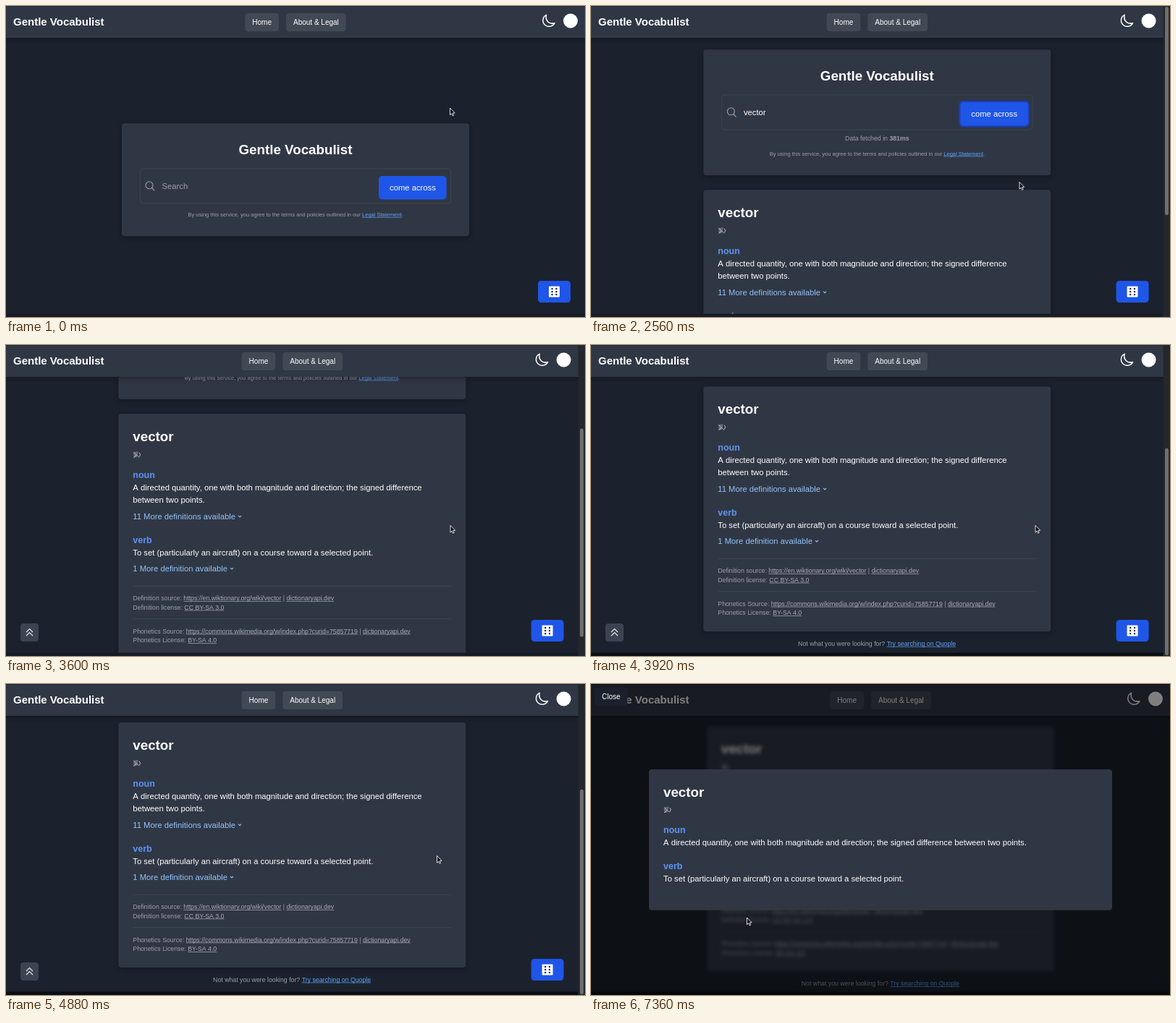
An HTML page with a canvas that plays this animation: 800x430 px, repeating every 7400 ms.

```html
<!DOCTYPE html>
<html lang="en">
<head>
<meta charset="utf-8">
<title>Gentle Vocabulist</title>
<style>
html, body { margin: 0; width: 100%; height: 100%; overflow: hidden; background: #1b222d; }
canvas { display: block; width: 800px; height: 430px; }
</style>
</head>
<body>
<canvas id="stage" width="800" height="430"></canvas>
<script>
const W = 800, H = 430, LOOP = 7400;
const NAME = 'Gentle Vocabulist', ENGINE = 'Quople';
const FONT = '"Liberation Sans", Arial, Helvetica, sans-serif';
const C = {
  bg: '#1b222d', card: '#303744', nav: '#414955', line: '#424956', white: '#ffffff',
  gray: '#99a0ab', blue: '#1f56e8', hover: '#1641d4', ring: '#1a3fbd',
  part: '#5c95f6', more: '#92c3fb', link: '#5fa2f7'
};
// moments of the story, in ms
const T = { dice: 720, word: 880, search: 1760, result: 2320, scroll: 3100, end: 4100, modal: 4900 };

const stage = document.getElementById('stage').getContext('2d');
const layer = document.createElement('canvas');
layer.width = W;
layer.height = H;
const layerCtx = layer.getContext('2d');
let g = stage;

const clamp = v => Math.max(0, Math.min(1, v));
const span = (t, a, b) => clamp((t - a) / (b - a));
const ease = p => p * p * (3 - 2 * p);

function box(x, y, w, h, r, fill) {
  g.beginPath();
  g.roundRect(x, y, w, h, r);
  g.fillStyle = fill;
  g.fill();
}

function shadowBox(x, y, w, h, r, fill) {
  g.save();
  g.shadowColor = 'rgba(0,0,0,.3)';
  g.shadowBlur = 7;
  g.shadowOffsetY = 2;
  box(x, y, w, h, r, fill);
  g.restore();
}

function stroke(points, color, width) {
  g.beginPath();
  points.forEach(([x, y], i) => i ? g.lineTo(x, y) : g.moveTo(x, y));
  g.strokeStyle = color;
  g.lineWidth = width;
  g.stroke();
}

function text(s, x, y, size, color = C.white, bold = false) {
  g.font = (bold ? 'bold ' : '') + size + 'px ' + FONT;
  g.fillStyle = color;
  g.fillText(s, x, y);
  return g.measureText(s).width;
}

function centered(s, x, y, size, color, bold) {
  g.textAlign = 'center';
  text(s, x, y, size, color, bold);
  g.textAlign = 'left';
}

// mixed line: "_" marks an underlined run, "*" a bold one
function runs(x, y, size, color, parts, linkColor = color) {
  for (const part of parts) {
    const under = part[0] === '_', bold = part[0] === '*';
    const tint = under ? linkColor : color;
    const w = text(under || bold ? part.slice(1) : part, x, y, size, tint, bold);
    if (under) {
      g.fillStyle = tint;
      g.fillRect(x, y + 1, w, 0.7);
    }
    x += w;
  }
}

function speaker(x, y) {
  g.save();
  g.translate(x, y);
  g.beginPath();
  g.moveTo(-5, -3);
  g.lineTo(-2, -4);
  g.lineTo(2, -4.5);
  g.lineTo(0, 3.5);
  g.lineTo(-4, 4);
  g.closePath();
  g.fillStyle = '#636973';
  g.fill();
  stroke([[-4.5, -3.5], [2.5, 3]], '#b4b9c0', 1);
  stroke([[-4.5, 4], [-0.5, 0.5]], '#c6cad0', 1);
  g.beginPath();
  g.arc(1, 0, 3.6, -0.9, 1.1);
  g.stroke();
  g.restore();
}

function searchCard(s) {
  const top = s.cardTop, btn = top + 72.7;
  shadowBox(160, top, 480, s.cardH, 4, C.card);
  centered(NAME, 400, top + 42.7, 18.75, C.white, true);
  g.beginPath();
  g.roundRect(185.4, top + 62.7, 429.2, 48, 4);
  g.strokeStyle = C.line;
  g.lineWidth = 0.8;
  g.stroke();
  g.beginPath();
  g.arc(198, top + 85.5, 5, 0, 7);
  g.strokeStyle = C.gray;
  g.lineWidth = 1.1;
  g.stroke();
  stroke([[201.7, top + 89.2], [205.2, top + 93]], C.gray, 1.2);
  text(s.word || 'Search', 215.6, top + 90.6, 11.25, s.word ? C.white : C.gray);
  if (s.searchFocus) box(513, btn - 2, 97.6, 36.4, 6, C.ring);
  box(515, btn, 93.6, 32.4, 4.5, s.searchHover ? C.hover : C.blue);
  text('come across', 530, top + 92.6, 11.25);
  if (s.done) runs(355.8, top + 125.6, 8.75, C.gray, ['Data fetched in ', '*381ms']);
  runs(251.5, top + s.cardH - 27.4, 7.5, C.gray,
    ['By using this service, you agree to the terms and policies outlined in our ', '_Legal Statement', '.'], C.link);
}

function more(s, y) {
  const w = text(s, 180, y, 11.25, C.more), x = 180 + w + 6;
  stroke([[x - 2, y - 5], [x, y - 3], [x + 2, y - 5]], C.more, 1.1);
}

function resultCard(y) {
  shadowBox(160, y, 480, 338.7, 4, C.card);
  text('vector', 180, y + 37.6, 18.75, C.white, true);
  speaker(185.5, y + 56.3);
  text('noun', 180, y + 88.2, 12.5, C.part, true);
  text('A directed quantity, one with both magnitude and direction; the signed difference', 180, y + 105.4, 11.25);
  text('between two points.', 180, y + 122.9, 11.25);
  more('11 More definitions available', y + 145.4);
  text('verb', 180, y + 178.2, 12.5, C.part, true);
  text('To set (particularly an aircraft) on a course toward a selected point.', 180, y + 195.4, 11.25);
  more('1 More definition available', y + 217.7);
  g.fillStyle = C.line;
  g.fillRect(180, y + 237.6, 440, 0.8);
  g.fillRect(180, y + 283, 440, 0.8);
  const small = (dy, parts) => runs(180, y + dy, 8.75, C.gray, parts, '#a5acb6');
  small(257.7, ['Definition source: ', '_https://en.wiktionary.org/wiki/vector', ' | ', '_dictionaryapi.dev']);
  small(270.2, ['Definition license: ', '_CC BY-SA 3.0']);
  small(303.2, ['Phonetics Source: ', '_https://commons.wikimedia.org/w/index.php?curid=75857719', ' | ', '_dictionaryapi.dev']);
  small(315.7, ['Phonetics License: ', '_BY-SA 4.0']);
}

function header(dx) {
  g.save();
  g.shadowColor = 'rgba(0,0,0,.35)';
  g.shadowBlur = 8;
  g.shadowOffsetY = 2;
  g.fillStyle = C.card;
  g.fillRect(-20, 0, W + 40, 44);
  g.restore();
  g.fillStyle = '#222933';
  g.fillRect(0, 0, W, 1);
  text(NAME, 10, 27.4, 15, C.white, true);
  g.save();
  g.translate(dx, 0);
  box(330.3, 10, 46.7, 25, 4, C.nav);
  text('Home', 340.3, 26, 10);
  box(387, 10, 82.7, 25, 4, C.nav);
  text('About & Legal', 397, 26, 10);
  g.restore();
  g.save();
  g.translate(dx * 2, 0);
  g.beginPath();
  g.moveTo(746.6, 12.4);
  g.bezierCurveTo(744.5, 20, 750.5, 25.8, 758, 23.6);
  g.bezierCurveTo(755.6, 28.6, 749, 29.8, 744.8, 26.2);
  g.bezierCurveTo(740, 21.6, 741.4, 15, 746.6, 12.4);
  g.closePath();
  g.strokeStyle = C.white;
  g.lineWidth = 1.5;
  g.lineJoin = 'round';
  g.stroke();
  g.beginPath();
  g.arc(780, 20.5, 10, 0, 7);
  g.fillStyle = C.white;
  g.fill();
  g.restore();
}

function diceButton(dx, focus, hover) {
  const x = 735 + dx * 2;
  if (focus) box(x - 2, 378, 49, 34, 6, C.ring);
  box(x, 380, 45, 30, 4.5, hover ? C.hover : C.blue);
  box(x + 15, 387.5, 15, 15, 1, C.white);
  for (let i = 0; i < 6; i++) {
    g.beginPath();
    g.arc(x + 19.6 + (i % 2) * 5.8, 391 + (i >> 1) * 4, 1.2, 0, 7);
    g.fillStyle = '#1a2340';
    g.fill();
  }
}

function upButton(alpha) {
  g.save();
  g.globalAlpha = alpha;
  box(20, 385, 25, 25, 4, '#3d4451');
  for (const y of [397, 402]) stroke([[28, y], [32.5, y - 4.5], [37, y]], '#eceef0', 1.1);
  g.restore();
}

function scrollbar(scroll) {
  g.fillStyle = '#24272b';
  g.fillRect(790.6, 0, 9.4, H);
  const top = 1 + scroll * 0.72;
  box(793, top, 5, Math.min(288, 429 - top), 2.5, '#6c6e70');
}

function modal() {
  box(80, 118, 640, 194.7, 4, C.card);
  text('vector', 100, 155.6, 18.75, C.white, true);
  speaker(105.5, 174);
  text('noun', 100, 206.2, 12.5, C.part, true);
  text('A directed quantity, one with both magnitude and direction; the signed difference between two points.', 100, 223, 11.25);
  text('verb', 100, 256.2, 12.5, C.part, true);
  text('To set (particularly an aircraft) on a course toward a selected point.', 100, 273, 11.25);
  box(5, 5, 45.5, 25, 4, '#1a212c');
  text('Close', 15, 21.3, 10);
}

// time, x, y of the pointer tip
const PATH = [
  [0, 613.5, 141], [120, 613.5, 141], [600, 762, 403], [920, 762, 403],
  [1340, 601, 247], [2340, 601, 247], [2540, 592, 243.5], [2720, 592, 243.5],
  [2980, 614, 249.5], [4480, 614, 249.5], [4760, 595.5, 237.5], [5720, 595.5, 237.5],
  [6160, 400, 280], [6840, 207, 309], [7240, 215.5, 323], [LOOP, 215.5, 323]
];

function pointerAt(t) {
  let i = 1;
  while (i < PATH.length - 1 && PATH[i][0] < t) i++;
  const a = PATH[i - 1], b = PATH[i], p = ease(span(t, a[0], b[0]));
  return [a[1] + (b[1] - a[1]) * p, a[2] + (b[2] - a[2]) * p];
}

function pointer(x, y, hand) {
  g.save();
  g.translate(x, y);
  g.lineJoin = 'round';
  g.beginPath();
  if (hand) {
    g.moveTo(-0.6, 0.6);
    g.quadraticCurveTo(0.4, -0.6, 1.2, 0.8);
    g.lineTo(1.8, 3.4);
    g.lineTo(5.4, 4);
    g.quadraticCurveTo(6.4, 4.4, 6, 6.4);
    g.lineTo(4.8, 10);
    g.lineTo(0.2, 10);
    g.lineTo(-2.8, 5.8);
    g.quadraticCurveTo(-2.2, 4.6, 0.2, 6);
  } else {
    for (const [px, py] of [[0, 0], [0, 9.6], [2.2, 7.6], [3.6, 10.8], [5.1, 10.1], [3.8, 7], [6.6, 6.8]]) g.lineTo(px, py);
  }
  g.closePath();
  g.fillStyle = hand ? C.white : '#090b0e';
  g.strokeStyle = hand ? '#11151c' : '#f2f3f5';
  g.lineWidth = 0.9;
  g.fill();
  g.stroke();
  g.restore();
}

function draw(t) {
  g = stage;
  const done = t >= T.result, open = t >= T.modal, loading = t >= T.search && !done;
  const dx = done && !open ? -4.7 : 0;
  const moved = 201 * (1 - Math.pow(1 - span(t, T.scroll, T.end), 2.25));
  const scroll = open ? 195.5 : moved;
  const [px, py] = pointerAt(t);
  const over = (x, y, w, h) => !open && px >= x && px <= x + w && py >= y && py <= y + h;
  const state = {
    done,
    word: t >= T.word ? 'vector' : '',
    cardTop: done ? 60.3 - scroll : loading ? 144.3 : 162.3,
    cardH: done ? 173.7 : loading ? 192 : 156,
    searchFocus: t >= T.search
  };
  state.searchHover = over(515 + dx, state.cardTop + 72.7, 93.6, 32.4);
  const diceHover = over(735 + dx * 2, 380, 45, 30);

  g.fillStyle = C.bg;
  g.fillRect(0, 0, W, H);

  if (open) {
    g = layerCtx;
    g.clearRect(0, 0, W, H);
    resultCard(254.3 - scroll);
    g = stage;
    g.filter = 'blur(2.5px)';
    g.drawImage(layer, 0, 0);
    g.filter = 'none';
  } else {
    g.save();
    g.translate(dx, 0);
    searchCard(state);
    if (done) resultCard(254.3 - scroll);
    g.restore();
  }
  if (done) {
    runs(290.8 + dx, 612.6 - scroll, 8.75, C.gray,
      ['Not what you were looking for? ', '_Try searching on ' + ENGINE], C.link);
  }
  g.fillStyle = scroll > 190 ? '#0b0e13' : '#161c26';
  g.fillRect(0, 425.5, W, 5);

  if (!open) {
    diceButton(dx, t >= T.dice && t < T.search, diceHover);
    const up = span(moved, 60, 130);
    if (up > 0) upButton(up);
  }
  header(dx);
  if (done && !open) scrollbar(scroll);

  if (open) {
    const a = ease(span(t, T.modal, T.modal + 160));
    g.fillStyle = 'rgba(0,0,0,' + 0.5 * a + ')';
    g.fillRect(0, 0, W, H);
    g.globalAlpha = a;
    modal();
    g.globalAlpha = 1;
  }
  pointer(px, py, state.searchHover || diceHover);
}

const start = performance.now();
function tick() {
  draw((performance.now() - start) % LOOP);
  requestAnimationFrame(tick);
}
tick();
</script>
</body>
</html>
```
